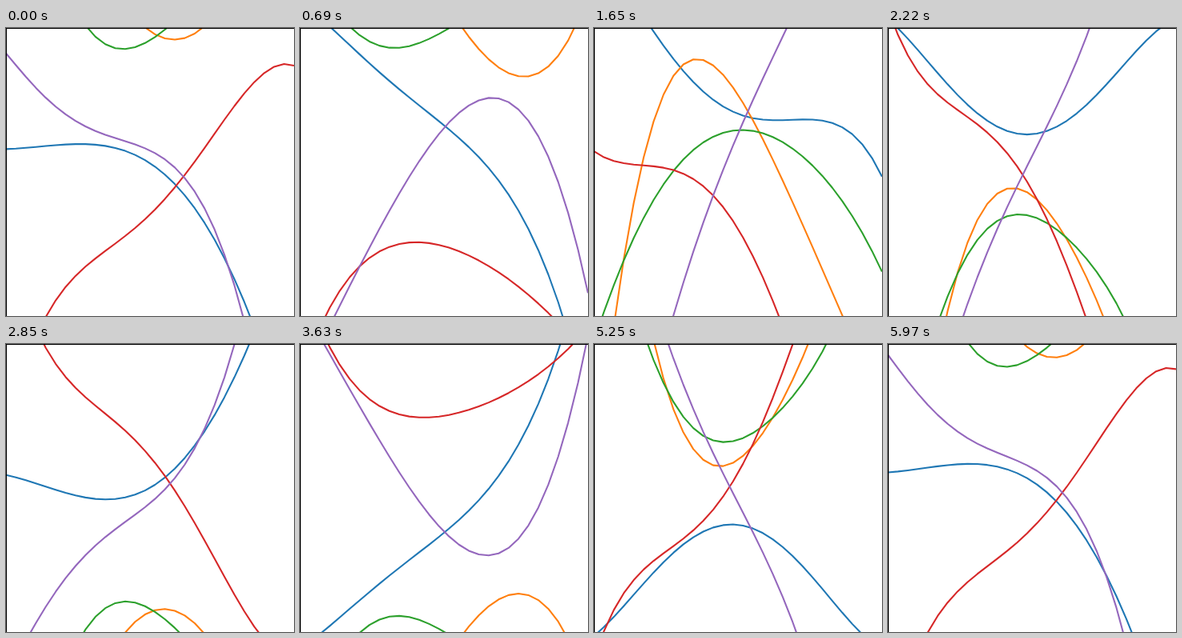
An HTML page with a canvas for the animation above (6000 ms loop, 360x360 px).

```html
<!DOCTYPE html>
<html>
<head>
<meta charset="utf-8">
<style>
  html, body { margin: 0; width: 360px; height: 360px; overflow: hidden; background: #fff; }
  canvas { display: block; }
</style>
</head>
<body>
<canvas id="stage" width="360" height="360"></canvas>
<script>
const SIZE = 360, MID = 180.4, LOOP = 6000, STEP = 30, POINTS = 30, SPINE = 1.05;
const ctx = document.getElementById('stage').getContext('2d');

// Polynomial with rising powers of u, where u runs from -1 (left edge) to 1 (right edge).
const poly = (...coeffs) => u => coeffs.reduceRight((sum, c) => sum * u + c, 0);

// Every curve swings between two shapes: MID + a(u) cos(phase) + b(u) sin(phase).
const curves = [
  { color: '#1f77b4',
    a: poly(-11.4, 118.1, 180.8, 76.8, -11.4, -7.9),
    b: poly(-75.9, 89.4, -148.3, 85.7, 109.1) },
  { color: '#ff7f0e',
    a: poly(-176.4, 125.2, -372.1, 20.9, -60.8, -25.2),
    b: poly(-126, 301.8, 254.1, -360.8, 177, 21.9, -52.1) },
  { color: '#2ca02c',
    a: poly(-165.1, -108.8, -218.1, 237.8, -124.6, -161.4),
    b: poly(-79.6, -28.6, 173.6, -10.2, -4.8, -10.2) },
  { color: '#d62728',
    a: poly(52.7, -174.8, -122.3, -52, 165.5, -2.5),
    b: poly(79.9, 273, 305.2, -17.9, -122.7, -17.6) },
  { color: '#9467bd',
    a: poly(-27.2, 86.8, 157.5, 289.6, 63.3, -34),
    b: poly(-53, -410.8, 162.6, -103.9, -13, 38.3) }
];

function draw(time) {
  const phase = Math.floor((time % LOOP) / STEP) * STEP / LOOP * 2 * Math.PI;
  const cos = Math.cos(phase), sin = Math.sin(phase);
  ctx.fillStyle = '#fff';
  ctx.fillRect(0, 0, SIZE, SIZE);
  ctx.lineWidth = 2.08;
  ctx.lineJoin = 'round';
  for (const { color, a, b } of curves) {
    ctx.strokeStyle = color;
    ctx.beginPath();
    for (let i = 0; i < POINTS; i++) {
      const part = i / (POINTS - 1), u = 2 * part - 1;
      ctx.lineTo(part * SIZE, MID + a(u) * cos + b(u) * sin);
    }
    ctx.stroke();
  }
  ctx.fillStyle = '#000';
  ctx.fillRect(0, 0, SIZE, SPINE);
  ctx.fillRect(0, 0, SPINE, SIZE);
}

const start = performance.now();
function tick() {
  draw(performance.now() - start);
  requestAnimationFrame(tick);
}
tick();
</script>
</body>
</html>
```
